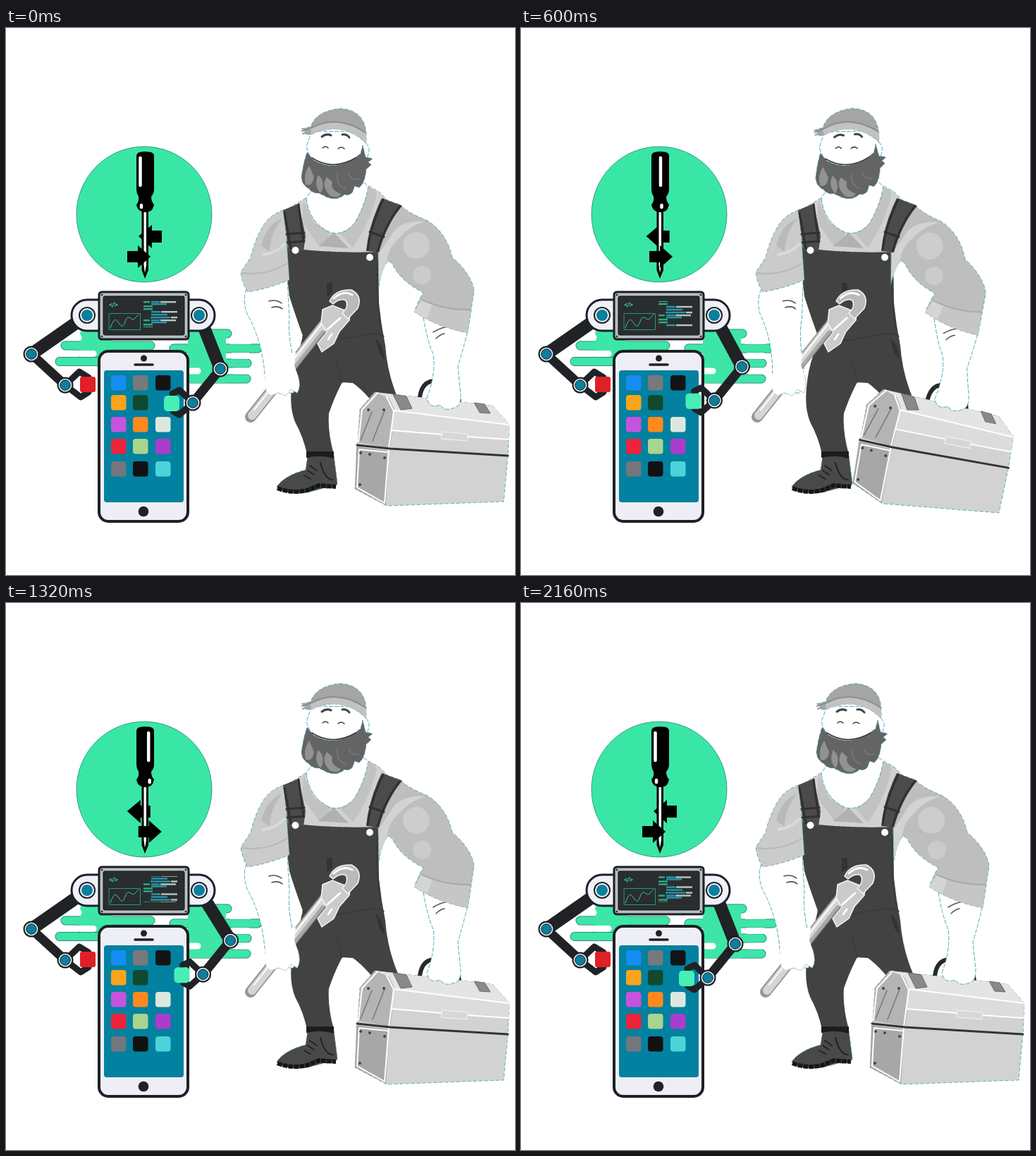
Recreate the animation shown at these times as an HTML page. Size 722 by 775 pixels, loop 2190 ms.

```html
<!DOCTYPE html>
<html lang="en">
<head>
<meta charset="utf-8">
<title>Repair service</title>
<style>
html, body { margin: 0; width: 100%; height: 100%; overflow: hidden; background: #fff; }
svg { display: block; width: 722px; height: 775px; }
.line { fill: none; stroke-linecap: round; stroke-linejoin: round; }
.skin { fill: #fff; stroke: #2699ad; stroke-width: .8; stroke-dasharray: 6 2; }
.cut { stroke: #2699ad; stroke-width: .7; stroke-dasharray: 5 3; }
.ink { stroke: #202225; }
.code { font: bold 9px "DejaVu Sans Mono", monospace; fill: #35dba0; }
</style>
</head>
<body>
<svg viewBox="0 0 722 775">
  <defs>
    <clipPath id="window"><rect x="194" y="387" width="50" height="37"/></clipPath>
    <g id="joint">
      <circle r="11.5" fill="#1d2228"/><circle r="9.3" fill="#f4f5fa"/>
      <circle r="7.3" fill="#0b7f9c" stroke="#1d2228" stroke-width="1"/>
    </g>
    <g id="shoulder">
      <path d="M37 -22H0A22 22 0 0 0 0 22H37Z" fill="#f0f0f7" stroke="#1b2030" stroke-width="3"/>
      <circle r="12" fill="#1d2228"/><circle r="10" fill="#f4f5fa"/><circle r="8" fill="#0b7f9c"/>
    </g>
    <g id="rows"></g>
  </defs>

  <!-- speed streaks -->
  <g class="line" stroke="#1c6f70" stroke-width="13"><path id="streaks" d="M84 450H205M76 472.500H150M112 433H140M262 433H314M238 454H357M262 475H342M262 497H341"/></g>
  <path d="M106 426H150V478H131V466H103V444H106ZM258 428H312V503H258Z" fill="#3de6a7"/>
  <use href="#streaks" class="line" style="stroke:#3de6a7;stroke-width:11.500"/>
  <path class="line" d="M84 438.500H103M106 461.500H124M320 443.500H345M322 464.500H343M324 486H342M262 486H272" stroke="#fff" stroke-width="9"/>

  <!-- screwdriver badge -->
  <circle cx="196" cy="264" r="96" fill="#3ae6a6" stroke="#1e8877" stroke-width=".8"/>
  <path id="arrowL" d="M188 295L207 279V287H221V304H207V312Z"/>
  <path d="M185 181Q185 175 197 175Q210 175 210 181V229Q210 234 206 239Q206 246 210 250Q208 260 202 260V343L197 355L192.500 343V260Q186 258 185 250Q189 246 188 239Q185 234 185 229Z"/>
  <path id="shine" class="line" d="M190.500 184V223M192 251V254" stroke="#fff" stroke-width="4.500"/>
  <path d="M195.500 261H199V336L197 347L195.500 336Z" fill="#fff"/>
  <path id="arrowR" d="M205 324L187 308V316H172V332H187V340Z"/>

  <!-- left arm -->
  <path class="line ink" d="M115 407L36 462" stroke-width="18"/>
  <path class="line ink" d="M36 462L84 506" stroke-width="13"/>
  <path class="line ink" d="M84 506L104 487L117 495M84 506L106 523L117 516" stroke-width="9"/>
  <use href="#joint" x="36" y="462"/>
  <use href="#joint" x="84" y="506"/>
  <use href="#shoulder" x="115" y="407"/>

  <!-- phone -->
  <rect x="132" y="458" width="126" height="241" rx="13" fill="#eeeef7" stroke="#1d2024" stroke-width="4"/>
  <circle cx="195.500" cy="468" r="4.500" fill="#222"/>
  <path class="line" d="M183 477H208" stroke="#222" stroke-width="3.500"/>
  <rect x="139" y="485" width="113" height="187" rx="4" fill="#0381a0"/>
  <circle cx="195" cy="685" r="7.300" fill="#202225"/>
  <g id="apps"></g>
  <rect x="105" y="494" width="22" height="22" rx="3" fill="#df2027"/>

  <!-- moving arm -->
  <path id="upper" class="line ink" stroke-width="18"/>
  <use href="#shoulder" transform="translate(274 407) scale(-1 1)"/>
  <g id="lower">
    <path class="line ink" d="M304 483L265 531" stroke-width="13"/>
    <path class="line ink" d="M265 531L246 513L236 518M265 531L246 548L237 543" stroke-width="9"/>
    <rect x="224" y="521" width="22" height="22" rx="5" fill="#47efb6"/>
    <use href="#joint" x="304" y="483"/>
    <use href="#joint" x="265" y="531"/>
  </g>

  <!-- control panel -->
  <rect x="132" y="374" width="127" height="67" rx="4" fill="#b9bfc1" stroke="#1b1d24" stroke-width="3"/>
  <rect x="138" y="380" width="115" height="55" rx="2" fill="#292d2d" stroke="#101212"/>
  <path class="line" d="M136 378h0M255 378h0M136 437h0M255 437h0" stroke="#333" stroke-width="3"/>
  <text class="code" x="146" y="395" letter-spacing="-1.700">&lt;/&gt;</text>
  <path class="line" d="M146.500 404.500H190.500V427.500H146.500Z" stroke="#21997f"/>
  <path class="line" d="M148 425C153 410 156 412 160 418S166 424 169 416S174 409 178 412S184 409 188 406" stroke="#45caa5"/>
  <g clip-path="url(#window)"><g id="scroll"><use href="#rows"/><use href="#rows" y="-26"/><use href="#rows" y="26"/><use href="#rows" y="52"/></g></g>

  <!-- shirt, overalls, boot -->
  <path class="cut" d="M394 260L430 238L508 222L528 231L542 245L524 320L398 314Z" fill="#d1d1d1"/>
  <path d="M422 244L436 275L461 291L446 311L420 275ZM516 223L526 234Q518 274 492 311L474 291Q504 270 516 223Z" fill="#c2c2c2"/>
  <path d="M443 309L465 290L486 312Z" fill="#b1b1b1"/>
  <path class="skin" d="M426 241Q430 277 461 290Q479 294 494 277Q509 253 514 224L490 205L440 220Z"/>
  <path d="M397 311Q460 320 528 317L529 390Q532 420 538 450Q541 490 556 525L520 530Q505 512 492 503L477 502Q467 520 458 546Q456 572 465 604H427Q422 580 410 558Q402 538 405 510Q407 485 414 465L421 436Q408 400 402 380Q398 350 397 311Z" fill="#424242"/>
  <path d="M455 361H463V376L455 382ZM524 440Q536 450 537 470L529 460Z" fill="#333"/>
  <path class="line" d="M421 437Q450 447 490 438T536 437M477 502L468 468M528 317Q523 380 532 425" stroke="#393939" stroke-width="1.500"/>
  <path class="cut" d="M384 650Q395 634 425 626L428 606H465L470 645Q468 653 450 652L428 658Q392 661 384 650Z" fill="#494949"/>
  <path d="M426 600H465V610Q447 604 426 609Z" fill="#1c1c1c"/>
  <path class="line" d="M385 652Q405 660 427 655L444 648L468 650" stroke="#161616" stroke-width="6" stroke-dasharray="7 1" style="stroke-linecap:butt"/>
  <path class="line" d="M431 620L441 627M428 627L437 633M423 634L432 639M446 616Q452 640 464 640" stroke="#222" stroke-width="2"/>

  <!-- sleeve by the wrench -->
  <g id="forearm">
    <path class="skin" d="M341 370Q335 385 342 405Q363 442 367 490L371 518L408 517L411 480Q399 440 402 410L399 357Z"/>
    <path class="line" d="M373 387Q383 384 391 390M377 396Q386 393 392 398" stroke="#555" stroke-width="1.500"/>
  </g>
  <path class="cut" d="M394 258Q372 265 362 285Q352 303 347 325L333 346Q335 362 343 374Q370 370 402 357L398 300Z" fill="#cbcbcb"/>
  <path d="M362 308Q370 278 392 270Q374 292 374 317Z" fill="#b9b9b9"/>
  <path class="line" d="M335 347Q368 352 398 334" stroke="#b6b6b6" stroke-width="2"/>
  <path class="line" d="M365 321Q385 318 395 306" stroke="#dadada" stroke-width="4"/>

  <!-- straps -->
  <path d="M393 258L415 249L425 295L422 316H400L398 294Z" fill="#4b4b4b"/>
  <path class="line" d="M395 262L404 312M415 250L422 303M398 292L423 290M399 304L423 302" stroke="#303030" stroke-width="3"/>

  <!-- wrench -->
  <g id="wrench">
    <path class="line" d="M347 551L455 416" stroke="#969696" stroke-width="16"/>
    <path class="line" d="M349 549L456 414" stroke="#d5d5d5" stroke-width="12"/>
    <path class="line" d="M352 541L451 415" stroke="#fff" stroke-width="2"/>
    <path class="line" d="M410 479L449 430" stroke="#aaa" stroke-width="4"/>
    <path d="M449 399L463 393L488 403L487 414L473 430L465 447L448 459L442 447L455 431L447 418Z" fill="#cbcbcb" stroke="#f5f5f5" stroke-width="1.500"/>
    <path d="M459 387Q467 370 490 371Q506 379 499 397L485 412L477 404Q487 394 482 386Q474 382 464 391Z" fill="#bababa" stroke="#f5f5f5" stroke-width="1.500"/>
    <path class="line" d="M465 383Q478 371 491 378M456 427L474 411M457 441L462 434" stroke="#fff" stroke-width="3"/>
    <path d="M367 490Q385 488 398 468L411 459L409 478L414 492Q419 508 413 517L404 512L397 521L386 517L376 521L369 514Z" fill="#fff"/>
    <path class="line" d="M414 492Q419 508 413 517L404 512L397 521L386 517L376 521" stroke="#9ebfc4" stroke-width=".8"/>
  </g>

  <!-- toolbox arm -->
  <g id="arm">
    <g id="box">
      <path class="line" d="M587 528Q590 506 607 505Q641 506 643 537" stroke="#292929" stroke-width="6"/>
      <path class="cut" d="M523 521L690 540L714 567L712 610L706 676L540 682L495 658L502 545Z" fill="#d2d2d2"/>
      <path d="M523 521L546 530L552 547L545 600L499 592L502 545Z" fill="#b4b4b4"/>
      <path d="M523 521L690 540L714 567L552 547L543 529Z" fill="#e4e4e4"/>
      <path d="M549 547L714 567L713 588L547 575Z" fill="#dcdcdc"/>
      <path d="M497 598L543 604L539 681L495 658Z" fill="#a7a7a7"/>
      <path class="line" d="M527 522L505 546L500 591M540 528L550 548L543 600L537 678L498 656L501 602L541 606M550 547L713 567M547 575L619 581M654 584L713 588" stroke="#fff" stroke-width="2"/>
      <path class="line" d="M498 596L545 601L712 611" stroke="#333" stroke-width="3"/>
      <path class="line" d="M520 590L537 547M503 589L519 549" stroke="#777" stroke-width="1.500"/>
      <path d="M619 577L655 580L654 590L617 587Z" fill="#d7d7d7" stroke="#f4f4f4"/>
      <path d="M549 524L568 527L576 544L560 546ZM664 536L679 538L687 551L672 550Z" fill="#898989" stroke="#6b6b6b"/>
      <path class="line" d="M514 546h0M536 546h0M503 607h0M516 609h0M537 614h0M502 652h0" stroke="#444" stroke-width="4"/>
    </g>
    <path class="skin" d="M592 410Q598 445 606 462Q610 490 597 524Q600 540 616 534Q622 544 636 538Q648 536 644 510L641 480Q650 450 655 428Z"/>
    <path class="line" d="M606 431Q616 425 623 424M610 440Q616 434 622 433" stroke="#555" stroke-width="1.500"/>
    <path class="cut" d="M538 243L558 250Q570 262 598 273Q625 290 633 325Q660 348 664 372L655 432Q612 424 579 402Q588 380 592 375Q562 360 550 338Q545 328 540 332Q532 345 529 365L527 300Z" fill="#bebebe"/>
    <path d="M590 385Q622 400 659 399L655 432Q612 424 579 402Z" fill="#c6c6c6"/>
    <path d="M590 385L605 391L597 412L579 402Z" fill="#d5d5d5"/>
    <path class="line" d="M590 385Q622 400 659 399" stroke="#aaa" stroke-width="2"/>
    <path d="M546 294Q558 272 595 274Q571 281 558 298Q543 310 541 328L529 360V320Z" fill="#d3d3d3"/>
    <circle cx="582" cy="308" r="19" fill="#cdcdcd"/>
    <circle cx="590" cy="350" r="13" fill="#cbcbcb"/>
  </g>
  <path d="M533 241L562 252Q540 278 529 318L511 316Q514 280 533 241Z" fill="#4b4b4b"/>
  <path class="line" d="M535 243Q517 280 513 314M559 252Q538 278 527 316M516 289L536 296" stroke="#303030" stroke-width="3"/>
  <circle cx="410.500" cy="315" r="5" fill="#fff"/>
  <circle cx="516" cy="325" r="5" fill="#fff"/>

  <!-- head -->
  <g id="head">
    <path class="skin" d="M434 146L426 168L431 182L447 202H490L512 184Q519 170 510 163L505 147Z"/>
    <path class="cut" d="M427 176L436 187Q463 203 492 186L503 178L506 166L510 183L520 185L514 190L518 194L511 200Q509 220 501 226L494 224Q492 239 480 236Q470 245 456 240L444 234Q434 234 430 228Q416 220 420 205Q422 191 427 176Z" fill="#646464"/>
    <path d="M430 195Q421 208 425 222Q435 225 437 211ZM443 208Q436 222 446 234Q452 226 448 214ZM455 211Q446 224 460 238Q472 242 475 235Q459 229 463 218Z" fill="#929292"/>
    <path class="line" d="M470 207Q468 224 482 228M486 207Q492 217 500 214" stroke="#747474" stroke-width="2"/>
    <path class="line" d="M434 184Q463 203 496 184" stroke="#3a3a3a" stroke-width="1.500"/>
    <path class="line" d="M448 154Q454 149 461 152M477 151Q483 150 487 155" stroke="#444" stroke-width="3"/>
    <path class="line" d="M449 170Q453 166 457 170M471 171Q475 167 480 171" stroke="#444" stroke-width="1.500"/>
    <path class="cut" d="M419 143L432 140Q440 117 475 114Q509 117 511 150V164Q493 145 468 143Q448 143 433 151L420 150L425 146Z" fill="#a5a5a5"/>
    <path d="M432 143Q470 122 511 150V164Q493 145 468 143Q448 143 433 151Z" fill="#c2c2c2"/>
    <path class="line" d="M420 146L434 141Q470 122 510 148" stroke="#8e8e8e" stroke-width="2"/>
  </g>
</svg>
<script>
const LOOP = 2190, TICK = 30;
const $ = id => document.getElementById(id);
const set = (id, value, name = "transform") => $(id).setAttribute(name, value);
const rect = (x, y, w, h, fill, r = 0) =>
  `<rect x="${x}" y="${y}" width="${w}" height="${h}" rx="${r}" fill="${fill}"/>`;

const apps = [
  ["#168df0", "#77797c", "#141414"],
  ["#fba31b", "#10492e", ""],
  ["#c653df", "#ff891c", "#dce8df"],
  ["#ed233d", "#a8d58d", "#aa3dcc"],
  ["#73777b", "#111", "#4bd3da"]
];
const appY = [492, 520, 551, 582, 614];
$("apps").innerHTML = apps.flatMap((row, j) => row.map((color, i) =>
  color && rect([149, 180, 212][i], appY[j], 21.5, 21.5, color, 4))).join("");

// Code lines: x, y, width, colour
const green = "#2daa83", teal = "#2596aa", pale = "#b9c4c3";
$("rows").innerHTML = [
  [195, 393, 13, green], [195, 397, 13, green],
  [206, 401, 13, teal], [220, 401, 23, pale],
  [206, 405, 23, teal], [205, 409, 28, teal], [234, 409, 9, pale],
  [195, 413, 9, green], [206, 413, 12, teal], [219, 413, 22, pale], [206, 416, 22, teal]
].map(([x, y, w, c]) => rect(x, y, w, 2.4, c)).join("");

const cubic = p => p < .5 ? 4 * p ** 3 : 1 - 4 * (1 - p) ** 3;
const bump = (t, from, to) =>
  t > from && t < to ? Math.sin(Math.PI * (t - from) / (to - from)) ** 2 : 0;

function draw(now) {
  const t = Math.floor(now % LOOP / TICK) * TICK;

  // badge and control panel
  const wave = (1 - Math.cos(2 * Math.PI * t / LOOP)) / 2;
  set("arrowL", `translate(${-18 * wave} 0)`);
  set("arrowR", `translate(${17.5 * wave} 0)`);
  set("shine", `translate(${13 * wave} 0)`);
  set("scroll", `translate(0 ${-26 * t / LOOP})`);

  // robot arm
  const reach = cubic(1 - Math.abs(1 - t / (LOOP / 2)));
  const dx = 15 * reach, dy = -5 * reach;
  set("upper", `M274 407L${304 + dx} ${483 + dy}`, "d");
  set("lower", `translate(${dx} ${dy})`);

  // worker
  const swing = bump(t, 0, 930), pull = -12 * bump(t, 0, 1240);
  const lean = -4.5 * bump(t, 0, 800) + 1.2 * bump(t, 740, 1300);
  set("head", `rotate(${lean} 465 240)`);
  set("arm", `rotate(${2.5 * swing} 555 240)`);
  set("box", `translate(0 ${-5 * Math.max(0, 1 - t / 150)}) rotate(${5.7 * swing} 620 525)`);
  set("wrench", `translate(${pull} 0)`);
  set("forearm", `translate(341 370) skewX(${Math.atan(pull / 140) * 180 / Math.PI}) translate(-341 -370)`);
}

const start = performance.now();
(function loop() {
  draw(performance.now() - start);
  requestAnimationFrame(loop);
})();
</script>
</body>
</html>
```
